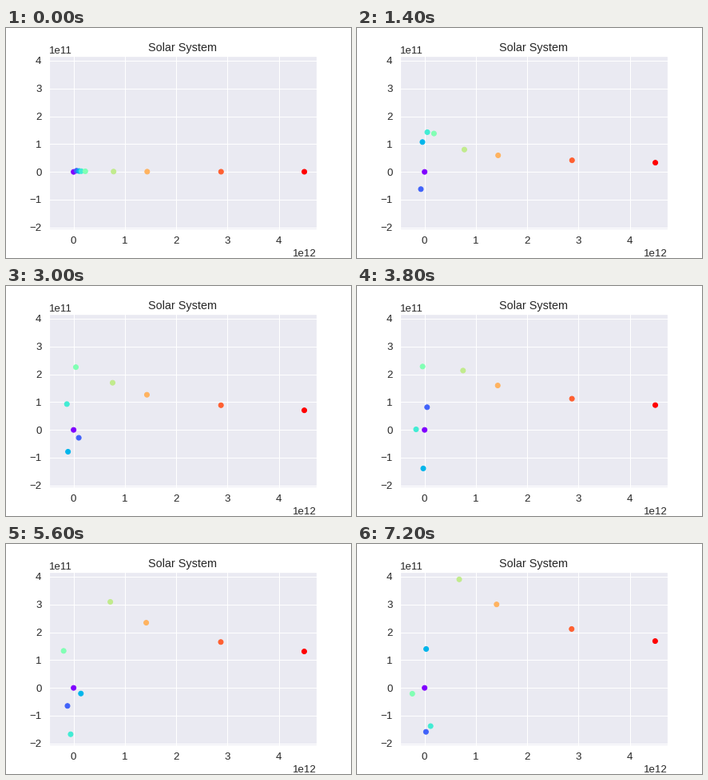
A matplotlib script that plays this animation: 432x288 px, repeating every 7400 ms.

```python
import matplotlib.pyplot as plt
import numpy as np
from matplotlib.animation import FuncAnimation
from matplotlib.ticker import MultipleLocator

FRAMES = 37
INTERVAL = 200        # ms
DAYS_PER_FRAME = 10
DAY = 86400.0         # s
GM = 6.674e-11 * 1.989e30

# Mean distance (m) and mean orbital speed (m/s), Mercury to Neptune
DISTANCE = np.array([57.9, 108.2, 149.6, 227.9, 778.6, 1433.5, 2872.5, 4495.1]) * 1e9
SPEED = np.array([47.4, 35.0, 29.8, 24.1, 13.1, 9.7, 6.8, 5.4]) * 1e3


def simulate(days):
    """Explicit Euler with one-day steps; its outward drift is part of the look."""
    pos = DISTANCE.astype(complex)
    vel = 1j * SPEED
    path = []
    for _ in range(days):
        acc = -GM * pos / np.abs(pos) ** 3
        pos, vel = pos + vel * DAY, vel + acc * DAY
        path.append(pos)
    return np.array(path)


path = simulate((FRAMES - 1) * DAYS_PER_FRAME + 1)

ink = "#262626"
plt.rcParams.update({
    "font.family": "Liberation Sans",
    "text.color": ink,
    "xtick.labelsize": 13.2,
    "ytick.labelsize": 13.2,
    "xtick.color": ink,
    "ytick.color": ink,
})

fig = plt.figure(figsize=(6, 4), dpi=72, facecolor="white")
fig.subplots_adjust(left=0.125, right=0.9, bottom=0.125, top=0.88)
ax = fig.add_subplot(facecolor="#EAEAF2")
ax.set_axisbelow(True)
ax.grid(color="white", linewidth=1, linestyle="-")
ax.tick_params(length=0, pad=9.5)
for spine in ax.spines.values():
    spine.set(color="white", linewidth=1.25)

ax.set_title("Solar System", fontsize=14.4, y=1.0, pad=6)
ax.set_xlim(-4.77e11, 4.732e12)
ax.set_ylim(-2.064e11, 4.184e11)
ax.xaxis.set_major_locator(MultipleLocator(1e12))
ax.yaxis.set_major_locator(MultipleLocator(1e11))

bodies = ax.scatter(np.zeros(9), np.zeros(9), s=36, c=np.arange(9),
                    cmap="rainbow", linewidths=1, edgecolors="face")


def draw(frame):
    planets = path[frame * DAYS_PER_FRAME]
    points = np.concatenate([[0], planets])   # the Sun stays at the centre
    bodies.set_offsets(np.column_stack([points.real, points.imag]))
    return [bodies]


def reset():
    return draw(0)


anim = FuncAnimation(fig, draw, frames=FRAMES, init_func=reset,
                     interval=INTERVAL, repeat=True)
plt.show()
```
